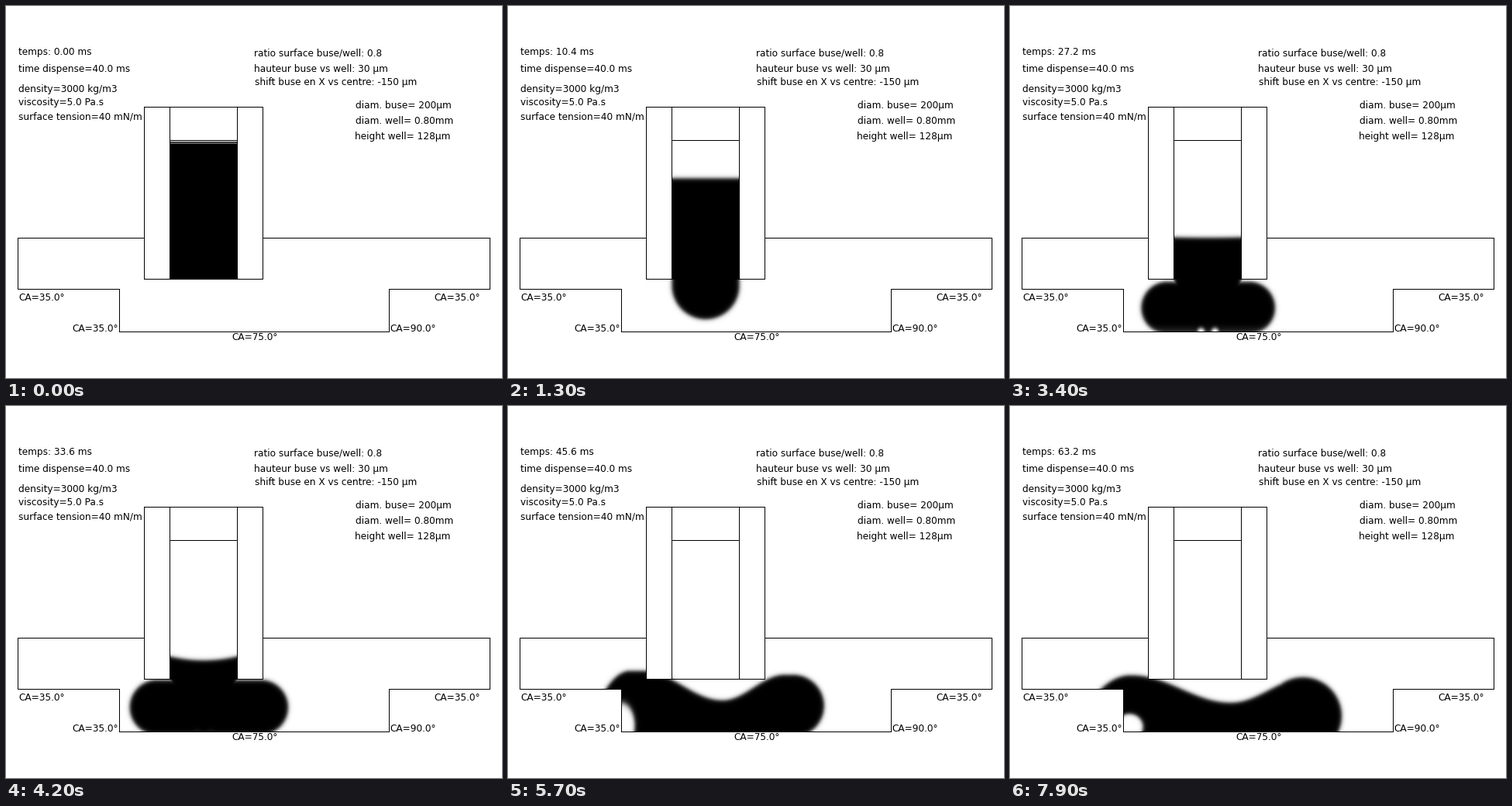
Animation, 640 px wide and 480 px high, one loop 8 s. Source, as a matplotlib script:

```python
import numpy as np
import matplotlib.pyplot as plt
from matplotlib.animation import FuncAnimation

plt.rcParams.update({"font.family": "DejaVu Sans", "font.size": 10.9})

FRAMES, STEP = 80, 100
STOP = 5.0                              # dispensing ends, seconds
MID, HALF = 255, 43.5                   # bore axis and half width
X0, X1, Y0, Y1 = 96, 446, 172, 422      # area the liquid can reach

X, Y = np.meshgrid(np.arange(X0, X1) + 0.5, np.arange(Y0, Y1) + 0.5)
BORE = (X > 211) & (X < 299) & (Y > 173) & (Y < 352)
WELL = (Y > 352) & (Y < 421) & ~((X < 146) & (Y > 365))
BESIDE = (Y > 299) & (Y < 352) & ((X < 179) | (X > 331))
OPEN = BORE | WELL | BESIDE


def ramp(t, a, b):
    u = np.clip((t - a) / (b - a), 0, 1)
    return u * u * (3 - 2 * u)


# Signed fields: positive inside the shape, in pixels.
def disc(cx, cy, r):
    return r - np.hypot(X - cx, Y - cy)


def capsule(xa, xb, cy, r):
    return r - np.hypot(X - np.clip(X, xa, xb), Y - cy)


def front(t):
    """Centre and radius of the advancing right-hand lobe."""
    r = np.interp(t, [1.3, 2.4, 5, 6.4, 7.9], [HALF, 31.5, 37, 43, 50])
    edge = np.interp(t, [1.3, 1.8, 2.4, 3.4, 5, 5.4, 6.3, 7.9],
                     [298.5, 304, 317, 342, 386, 400, 423.5, 428])
    bottom = 352 + 70 * (1 - np.exp(-t / 0.95)) + 3 * ramp(t, 2.5, 3.3)
    bottom += np.interp(t, [5, 6.4, 7.9], [0, 4, 25])
    return edge - r, bottom - r, r


def dispensing(t):
    """Column sinking in the bore above a drop that spreads on the floor."""
    hx, hy, r = front(t)
    left = np.interp(t, [1.3, 1.8, 2.4, 3.4, 5], [211.5, 206, 193, 169.5, 150])
    u = (X - MID) / HALF
    sag = 14 * (max(t - 3, 0) / 2) ** 2
    below_top = Y - (174.8 + 36.5 * t - sag * u**2)

    column = np.minimum(np.minimum(below_top, HALF - abs(X - MID)), hy - Y)
    tip = disc(163, 357, -6 + 20 * ramp(t, 4.2, STOP))
    drop = np.maximum(np.maximum(column, tip), capsule(left + r, hx, hy, r))
    return np.where(BORE, below_top, drop)


def relaxing(t):
    """Free liquid: left mound, valley, right lobe and a trapped bubble."""
    k = 1 - np.exp(-(t - STOP) / 0.6)
    late = np.clip((t - 6.4) / 1.5, 0, 1)
    hx, hy, r = front(t)

    valley_x, valley_y = 258 + 27 * k, 359 + 30 * k - 6 * late
    mound_x, mound_y = 163 - 8 * k, 342.5 - k + 6 * late
    x = X[0]
    reach = np.where(x < valley_x, 48 + 80 * k, 38 + 62 * k)
    phase = np.pi * np.clip(abs(x - valley_x) / reach, 0, 1)
    crest = np.where(x < valley_x, mound_y, hy - r)
    surface = crest + (valley_y - crest) * (1 + np.cos(phase)) / 2
    surface += np.maximum(mound_x - x, 0) ** 2 / (14 + 40 * k + 27 * late)
    depth = (Y - surface) / np.hypot(1, np.gradient(surface))

    body = np.maximum(np.minimum(depth, hx - X), disc(hx, hy, r))
    rx, ry = 17.5, 16.5 + 45.5 * np.exp(-(t - STOP) / 0.55)
    bx, by = 146 + 8 * late, 420 - 11 * k + 5 * late
    bubble = (1 - np.hypot((X - bx) / rx, (Y - by) / ry)) * rx
    return np.minimum(body, -bubble)


def liquid(t):
    """Liquid fraction per pixel, 0 to 1."""
    if t == 0:
        # undisturbed fill with thin layers on top
        layers = 0.9 * ((Y > 175) & (Y < 176)) + 0.65 * ((Y > 176) & (Y < 178))
        return BORE * np.where(Y > 178, 1, layers)

    field = dispensing(t) if t < STOP else relaxing(t)
    out = 0.5 + 0.5 * np.tanh(field / 3)

    # gas pockets and a thin film while the drop wets the floor
    wet = ramp(t, 2.8, 3.3) * (1 - ramp(t, 3.5, 4.3))
    film = 0.1 * np.exp(-((Y - 420) / 7) ** 2)
    for cx in (246.5, 264.5):
        pocket = np.exp(-((X - cx) / 5) ** 2 - ((Y - 420) / 5) ** 2)
        film = np.maximum(film, pocket)
    return OPEN * out * (1 - wet * film)


fig = plt.figure(figsize=(8, 6), dpi=80, facecolor="white")
ax = fig.add_axes([0, 0, 1, 1])
ax.set(xlim=(0, 640), ylim=(480, 0))
ax.axis("off")

img = ax.imshow(1 - liquid(0), cmap="gray", vmin=0, vmax=1, zorder=0,
                extent=(X0, X1, Y1, Y0), interpolation="nearest", aspect="auto")


def line(*pts):
    ax.plot(*zip(*pts), color="black", lw=0.9, antialiased=False,
            solid_joinstyle="miter", solid_capstyle="projecting", zorder=2)


line((178, 299), (15, 299), (15, 365), (146, 365), (146, 420),
     (494, 420), (494, 365), (624, 365), (624, 299), (331, 299))
for a, b in ((178, 211), (298, 331)):
    line((a, 130), (b, 130), (b, 352), (a, 352), (a, 130))
for y in (130, 173, 352):
    line((211, y), (298, y))

LABELS = [
    (16, 85, "time dispense=40.0 ms"),
    (16, 111, "density=3000 kg/m3"),
    (16, 128, "viscosity=5.0 Pa.s"),
    (16, 147, "surface tension=40 mN/m"),
    (320, 64, "ratio surface buse/well: 0.8"),
    (320, 85, "hauteur buse vs well: 30 µm"),
    (321, 102, "shift buse en X vs centre: -150 µm"),
    (451, 132, "diam. buse= 200µm"),
    (451, 152, "diam. well= 0.80mm"),
    (450, 172, "height well= 128µm"),
    (16, 380, "CA=35.0°"),
    (85, 420, "CA=35.0°"),
    (291, 431, "CA=75.0°"),
    (495, 420, "CA=90.0°"),
    (552, 380, "CA=35.0°"),
]
for x, y, s in LABELS:
    ax.text(x, y, s, va="baseline", zorder=3)
clock = ax.text(16, 63, "", va="baseline", zorder=3)


def update(i):
    ms = 0.8 * i
    clock.set_text(f"temps: {ms:.{2 if ms < 9.9 else 1}f} ms")
    img.set_data(1 - liquid(i / 10))
    return img, clock


anim = FuncAnimation(fig, update, frames=FRAMES, interval=STEP, repeat=True,
                     repeat_delay=0)
plt.show()
```
